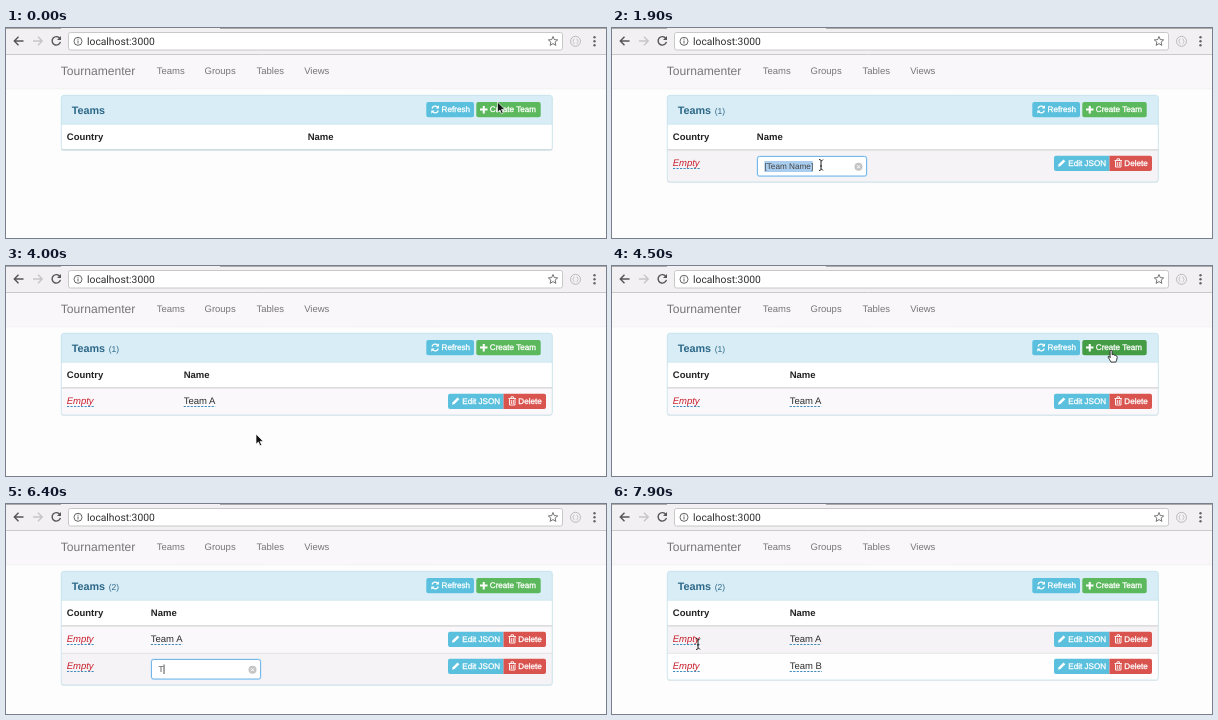
Recreate the animation shown at these times as an HTML page. Size 600 by 210 pixels, loop 8 s.

```html
<!DOCTYPE html>
<html lang="en">
<head>
<meta charset="utf-8">
<title>Teams</title>
<style>
  html, body { margin: 0; width: 100%; height: 100%; overflow: hidden; background: #fefdfe; }
  svg { display: block; width: 600px; height: 210px; text-rendering: geometricPrecision; }
  text { font: 9.5px "Liberation Sans", Arial, sans-serif; fill: #2e2e2e; white-space: pre; }
  .url { font: 10.3px Roboto, Inter, sans-serif; }
  .brand { font-size: 12.1px; fill: #777; }
  .nav { fill: #777; }
  .title { font-size: 10.8px; font-weight: bold; fill: #2c6887; }
  .count { font-size: 8.5px; fill: #2c6887; }
  .head { font-weight: bold; fill: #222; }
  .btn { font-size: 8.1px; fill: #fff; stroke: #fff; stroke-width: .3px; }
  .empty { font-style: italic; fill: #c8202f; }
  .field { font-size: 8.2px; fill: #444; }
  .dash { stroke: #2b7fb5; stroke-width: .9; stroke-dasharray: 2.2 1.3; }
  .line { fill: none; stroke: #555; stroke-width: 1.4; }
  .icon { fill: none; stroke: #fff; stroke-width: 1.3; }
</style>
</head>
<body>
<svg viewBox="0 0 600 210">
  <defs>
    <g id="edit-buttons">
      <path d="M444 5.700h53.500v15.300h-53.500a2 2 0 0 1-2-2v-11.300a2 2 0 0 1 2-2z" fill="#5bc0de"/>
      <path d="M497.500 5.700h40.500a2 2 0 0 1 2 2v11.300a2 2 0 0 1-2 2h-40.500z" fill="#d9534f"/>
      <path d="M446 16.700l.7-2.500 4.800-4.800 1.800 1.800-4.800 4.800z" fill="#fff"/>
      <path class="icon" d="M502.500 10.500h7.500M505 10v-1.200h2.500v1.200M503.500 11v6h5.500v-6M505.300 12v4M507.300 12v4" style="stroke-width:.9"/>
      <text class="btn" x="456.300" y="16.200">Edit JSON</text>
      <text class="btn" x="512.300" y="16.200">Delete</text>
    </g>
  </defs>

  <!-- Browser toolbar -->
  <rect width="600" height="26.500" fill="#f2f0f2"/>
  <path d="M0 .5H55M214 .5H600" stroke="#aaa"/>
  <path d="M0 26.500H600" stroke="#cbcacb"/>
  <path class="line" d="M17.500 13h-9M12.500 8.800l-4.200 4.200 4.200 4.200"/>
  <path class="line" d="M27 13h9M32 8.800l4.200 4.200-4.200 4.200" style="stroke:#c6c6c6"/>
  <path class="line" d="M53.800 10.500a4.200 4.200 0 1 0 .6 3.400"/>
  <path d="M55 8v4h-4z" fill="#555"/>
  <rect x="62.500" y="4.500" width="494" height="17.500" rx="2" fill="#fff" stroke="#c9c8c9"/>
  <circle cx="72" cy="13.300" r="4" fill="none" stroke="#666"/>
  <path d="M72 12.500v3M72 10.700v1" stroke="#666"/>
  <text class="url" x="81" y="16.700">localhost:3000</text>
  <path d="M547 8.500l1.300 3.100 3.400.3-2.600 2.200.8 3.300-2.900-1.800-2.900 1.800.8-3.300-2.600-2.200 3.400-.3z" fill="none" stroke="#666" stroke-width=".9"/>
  <circle cx="569.500" cy="13.300" r="5" fill="none" stroke="#bbb"/>
  <path d="M568.500 10.800q-1 0-1 1.200t-.8 1.300q.8 0 .8 1.300t1 1.200M570.500 10.800q1 0 1 1.200t.8 1.300q-.8 0-.8 1.300t-1 1.200" fill="none" stroke="#bbb" stroke-width=".7"/>
  <g fill="#666"><circle cx="588.500" cy="9.300" r="1.200"/><circle cx="588.500" cy="13.300" r="1.200"/><circle cx="588.500" cy="17.300" r="1.200"/></g>

  <!-- Navigation -->
  <rect y="27" width="600" height="33.500" fill="#f9f7f9"/>
  <path d="M0 60.800H600" stroke="#eeecee" stroke-width=".7"/>
  <text class="brand" x="54.700" y="46.700">Tournamenter</text>
  <text class="nav" x="150.800" y="46.100">Teams</text>
  <text class="nav" x="198.500" y="46.100">Groups</text>
  <text class="nav" x="250.500" y="46.100">Tables</text>
  <text class="nav" x="298.200" y="46.100">Views</text>

  <!-- Panel -->
  <rect id="shadow" x="55" y="68" width="491.500" rx="2.600" fill="#e6e6e8"/>
  <rect id="panel" x="55.300" y="67.300" width="491" rx="2.600" fill="#fff"/>
  <path d="M55.300 96.300V70a2.600 2.600 0 0 1 2.600-2.700H543.700a2.600 2.600 0 0 1 2.600 2.700V96.300z" fill="#d9edf7"/>
  <path d="M55.300 96.300H546.300" stroke="#c9e6f0" stroke-width=".7"/>
  <text class="title" x="65.700" y="85.800">Teams</text>
  <text class="count" id="count" x="102.700" y="85.800"></text>
  <rect x="420.300" y="74" width="47.700" height="15.300" rx="2" fill="#5bc0de"/>
  <path class="icon" d="M426 80.500a3.200 3.200 0 0 1 5.600-1.200M432.300 82.500a3.200 3.200 0 0 1-5.600 1.200"/>
  <path d="M433 77.300v3.300h-3.300zM425.300 85.700v-3.300h3.300z" fill="#fff"/>
  <text class="btn" x="435.600" y="84.400">Refresh</text>
  <rect id="create" x="470.300" y="74" width="64.400" height="15.300" rx="2"/>
  <rect id="ring" x="470.200" y="73.900" width="64.800" height="15.600" rx="2" fill="none" stroke="#5b9fd0" stroke-width="1.700"/>
  <path class="icon" d="M474 81.600h7.500M477.750 77.900v7.500" style="stroke-width:2"/>
  <text class="btn" x="483.800" y="84.400">Create Team</text>
  <text class="head" x="60.800" y="112">Country</text>
  <text class="head" id="name-head" y="112">Name</text>
  <g id="rows"></g>
  <path d="M55.300 121.700H546.300" stroke="#ddd" stroke-width="1.200"/>
  <rect id="frame" x="55.300" y="67.300" width="491" rx="2.600" fill="none" stroke="#bce0ea" stroke-width=".7"/>

  <!-- Pointers, each with its hotspot at 0,0 -->
  <g id="arrow"><path d="M0 0v10.200l2.400-2.200 1.600 3.700 1.700-.7-1.600-3.600h3.200z" fill="#111" stroke="#fff" stroke-width=".7"/></g>
  <g id="hand"><path d="M-.9 1q0-1.300 1-1.300t1 1.300v3.200q2-.6 2.400.5 1.600-.2 1.700.8 1.200 0 1 1.500l-.6 2.700-.8 1.900h-4.800l-1.600-2.800q-1.900-2.600-1-3t1.700 1.400z" fill="#fff" stroke="#222" stroke-width=".9"/></g>
  <g id="beam"><path d="M-2-5.500q2 0 2 1.200t2-1.200M0-4.500v9M-2 5.500q2 0 2-1.200t2 1.200M-1 1h2" fill="none" stroke="#222" stroke-width="1"/></g>
</svg>

<script>
const LOOP = 8000, STEP = 100, TOP = 122;
const $ = id => document.getElementById(id);
const set = (el, attrs) => { for (const k in attrs) el.setAttribute(k, attrs[k]); };
const show = (el, on) => el.style.display = on ? "" : "none";

// Life of each team row; keys are the moments of typed letters
const teams = [
  { born: 600, edit: 1500, saved: 3800, name: "Team A", keys: [2700, 2800, 2900, 3100, 3300, 3500] },
  { born: 4800, edit: 5900, saved: 7400, name: "Team B", keys: [6400, 6500, 6600, 6800, 6900, 7100] }
];

// Pointer path: time, x, y
const path = [
  [0, 491.5, 74], [200, 496, 81], [700, 496, 81], [1300, 209, 137],
  [3800, 209, 137], [4000, 250, 168], [4400, 499, 84.5], [4900, 499, 84.5],
  [5500, 203, 159], [7400, 203, 159], [7800, 86, 140], [8000, 86, 140]
];

for (const team of teams) {
  const g = document.createElementNS("http://www.w3.org/2000/svg", "g");
  g.innerHTML = `
    <rect class="bg" x="55.600" width="490.400"/>
    <path d="M55.600 .3H546" stroke="#ddd" stroke-width=".7"/>
    <text class="empty" x="60.700" y="16.200">Empty</text>
    <path class="dash" d="M61 18.500h27"/>
    <g class="view"><text y="16.200"></text><path class="dash"/></g>
    <g class="form">
      <rect x="144.500" y="5.500" width="111" height="21.500" rx="3" fill="#cfe5f6"/>
      <rect x="145.500" y="6.500" width="109" height="19.500" rx="2" fill="#fff" stroke="#66afe9" stroke-width=".9"/>
      <rect class="sel" x="152.300" y="11" width="48.500" height="11" fill="#a9cdee"/>
      <text class="field" x="152.500" y="19.200"></text>
      <path class="caret" stroke="#222" stroke-width=".8"/>
      <circle cx="246.500" cy="16.800" r="4" fill="#c4c4c4"/>
      <path d="M245 15.300l3 3m0-3l-3 3" stroke="#fff"/>
    </g>
    <use href="#edit-buttons"/>`;
  $("rows").append(g);
  team.g = g;
  for (const part of ["bg", "view", "form", "sel", "field", "caret"]) team[part] = g.querySelector("." + part);
}

function pointerAt(t) {
  const i = Math.max(1, path.findIndex(p => p[0] > t));
  const [t0, x0, y0] = path[i - 1], [t1, x1, y1] = path[i];
  const u = (t - t0) / (t1 - t0), e = u * u * (3 - 2 * u);
  return [x0 + (x1 - x0) * e, y0 + (y1 - y0) * e];
}

function drawRow(team, i, t, y, h, nameX, hover) {
  set(team.g, { transform: `translate(0 ${y})` });
  set(team.bg, { height: h, fill: hover ? "#f5f3f5" : i ? "#fefefe" : "#faf8fa" });
  const editing = t >= team.edit && t < team.saved;
  show(team.view, !editing);
  show(team.form, editing);
  if (editing) {
    const typed = team.keys.filter(k => k <= t).length;
    const lastKey = team.keys[typed - 1];
    team.field.textContent = typed ? team.name.slice(0, typed) : "[Team Name]";
    show(team.sel, !typed);
    show(team.caret, typed && (t - lastKey) % 1000 < 500);
    const x = 153 + team.field.getComputedTextLength();
    set(team.caret, { d: `M${x} 11.500v9.500` });
  } else {
    const [label, dash] = team.view.children;
    label.textContent = t < team.saved ? "[Team Name]" : team.name;
    set(label, { x: nameX });
    set(dash, { d: `M${nameX} 18.500h${label.getComputedTextLength()}` });
  }
}

function render(t) {
  const [px, py] = pointerAt(t);
  const live = teams.filter(m => t >= m.born);
  const editing = live.some(m => t >= m.edit && t < m.saved);
  const unnamed = live.some(m => t < m.edit);
  const nameX = !live.length ? 301.7 : editing ? 144.8 : unnamed ? 165.3 : 177.7;

  let y = TOP;
  teams.forEach((m, i) => {
    const on = t >= m.born;
    show(m.g, on);
    if (!on) return;
    const h = t >= m.edit && t < m.saved ? 32 : 27;
    drawRow(m, i, t, y, h, nameX, py >= y && py < y + h);
    y += h;
  });

  set($("panel"), { height: y - 67.3 });
  set($("frame"), { height: y - 67.3 });
  set($("shadow"), { height: y - 67.2 });
  set($("name-head"), { x: nameX });
  $("count").textContent = live.length ? `(${live.length})` : "";

  const onCreate = px > 470 && px < 535 && py > 75 && py < 89;
  set($("create"), { fill: onCreate || unnamed ? "#449d44" : "#5cb85c" });
  show($("ring"), unnamed);

  const typing = teams.some(m => t >= m.keys[0] - 100 && t < m.saved);
  const kind = onCreate ? "hand" : py > 125 && py < y && px < 260 ? "beam" : "arrow";
  for (const id of ["arrow", "hand", "beam"]) {
    show($(id), id === kind && !typing);
    set($(id), { transform: `translate(${px} ${py})` });
  }
}

const start = performance.now();
function tick() {
  const t = (performance.now() - start) % LOOP;
  render(Math.floor(t / STEP) * STEP);
  requestAnimationFrame(tick);
}
tick();
</script>
</body>
</html>
```
